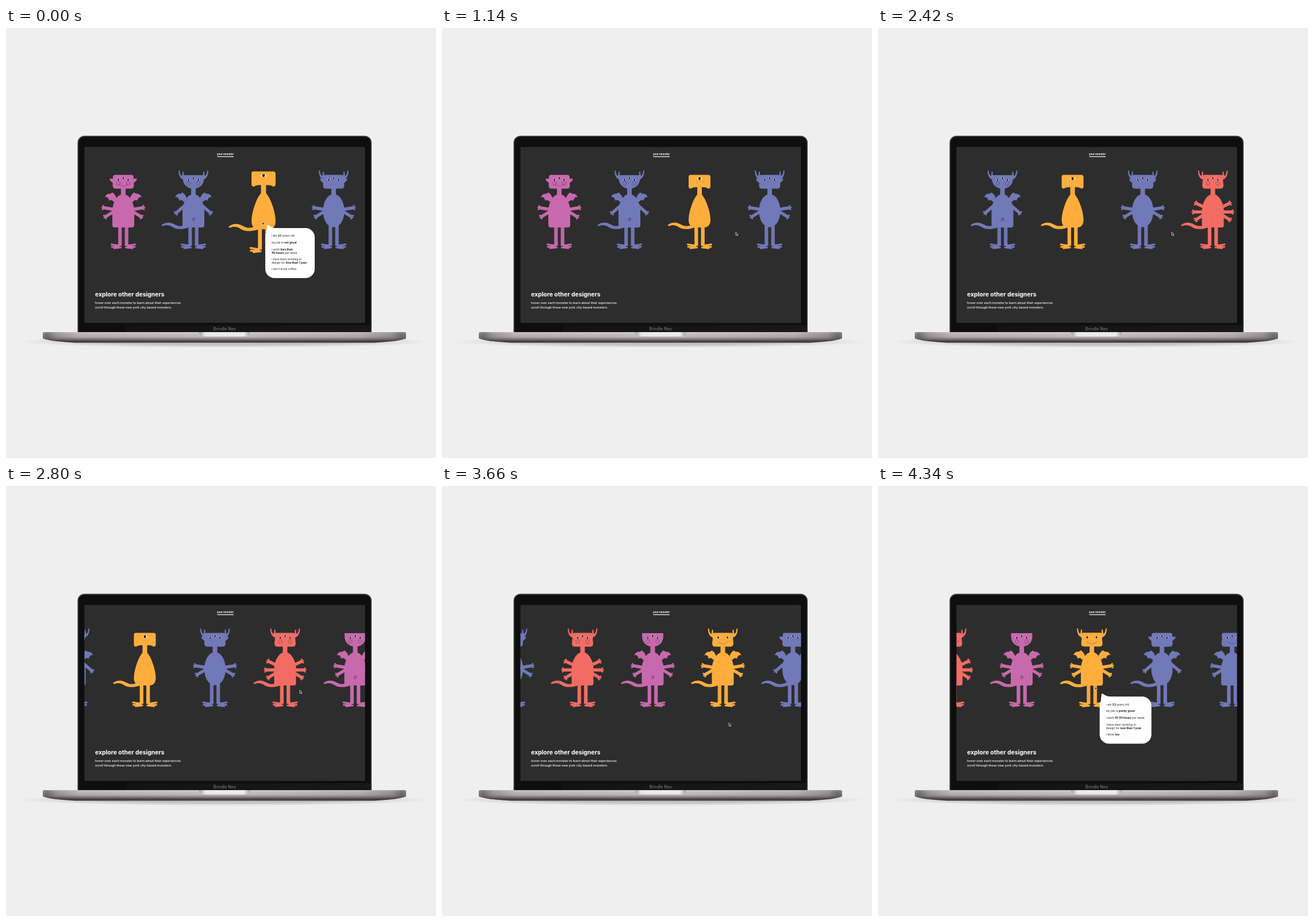
Write an HTML page with a canvas that moves like this. It is 748 by 748 pixels and loops after 4360 ms.

```html
<!DOCTYPE html>
<html lang="en">
<head>
<meta charset="utf-8">
<title>your monster</title>
<style>
html, body { margin: 0; width: 100%; height: 100%; overflow: hidden; background: #efefef; }
canvas { display: block; width: 748px; height: 748px; }
</style>
</head>
<body>
<canvas id="stage"></canvas>
<script>
const LOOP = 4360, STEP = 20, SIZE = 748, GAP = 122, MID_Y = 315;
const FONT = 'Inter, "Open Sans", sans-serif';
const PINK = '#c869ad', BLUE = '#7279b8', ORANGE = '#ffae3d', RED = '#f36c63';
const INK = 'rgba(35,25,50,.6)';

const canvas = document.getElementById('stage');
const ctx = canvas.getContext('2d');
const dpr = window.devicePixelRatio || 1;
canvas.width = canvas.height = SIZE * dpr;

const shapes = {
  rect: 'M-14 255.5H14Q18 255.5 18 259.5Q17 266 18.5 274Q18.5 279.5 13 279.5H-13Q-18.5 279.5 -18.5 274Q-17 266 -18 259.5Q-18 255.5 -14 255.5Z',
  bowl: 'M-18.5 256H18.5V261C18.5 273 10 279.5 0 279.5C-10 279.5 -18.5 273 -18.5 261Z',
  flare: 'M-16 255.5H16Q19 256 19 259.5V276Q18.5 279.5 15.5 279.5Q12 277 8 277H-8Q-12 277 -15.5 279.5Q-18.5 279.5 -19 276V259.5Q-19 255.5 -16 255.5Z',
  bell: 'M0 289C11.5 289 19 306 19 318V343Q19 347 15 347H-15Q-19 347 -19 343V318C-19 306 -11.5 289 0 289Z',
  oval: 'M0 289C11 289 18.5 303 18.5 318C18.5 334 11 346.5 0 346.5C-11 346.5 -18.5 334 -18.5 318C-18.5 303 -11 289 0 289Z',
  drop: 'M0 288C8 288 19 318 19 334C19 343 14 347 8 347H-8C-14 347 -19 343 -19 334C-19 318 -8 288 0 288Z',
  fin: 'M-23.5 261.5Q-19 263 -15 261V271Q-19 270 -20.5 267.5Q-23.5 266 -23.5 261.5Z',
  horn: 'M-16 264Q-25.5 262 -25.8 248.5Q-25 247 -23.8 248.5Q-23.5 255 -20.3 257.5Q-18.8 255 -19 250.5Q-17.8 249 -17 250.5Q-16.5 255 -17.5 259H-15Z',
  wing: 'M-9 305Q-12 290 -19 286Q-22 289 -26 288.5Q-30 289.5 -32 294.5Q-26.5 292 -24.5 300.5Q-20 297 -17 302.5Q-14 300 -9 305Z',
  tail: 'M-54.5 342C-46 336 -38 338.5 -32 342C-26 345.5 -18 346 -8 340V347C-22 351.5 -31 350 -36 346.5C-43 342 -48 342.5 -53 344.5Q-56 344.5 -54.5 342Z',
  spiral: 'M0 332Q1.5 331 1 333Q-1.5 334.5 -1.8 332Q-1.5 329.5 1 330Q3.4 331.5 2.4 334Q0 336.5 -2.8 334.5'
};
for (const k in shapes) shapes[k] = new Path2D(shapes[k]);

const monsters = [
  { color: PINK, head: 'rect', body: 'bell', fins: 1, wings: 1, arms: 2, eyes: 3, smile: 1, cheeks: 1, dots: 1 },
  { color: BLUE, head: 'bowl', body: 'bell', horns: 1, wings: 1, arms: 1, eyes: 3, cheeks: 1, navel: 1, tail: 1, dots: 1 },
  { color: ORANGE, head: 'flare', body: 'drop', arms: 0, eyes: 1, tail: 1 },
  { color: BLUE, head: 'rect', body: 'oval', fins: 1, horns: 1, arms: 2, eyes: 3, dots: 1 },
  { color: RED, head: 'rect', body: 'bell', horns: 1, arms: 3, eyes: 3, cheeks: 1, tail: 1 },
  { color: PINK, head: 'bowl', body: 'bell', wings: 1, arms: 2, eyes: 3, cheeks: 1, navel: 1, tail: 1 },
  { color: ORANGE, head: 'rect', body: 'bell', horns: 1, wings: 1, arms: 2, eyes: 2, smile: 1, tail: 1, dots: 1 },
  { color: BLUE, head: 'rect', body: 'oval', fins: 1, wings: 1, arms: 1, eyes: 3, tail: 1 },
  { color: BLUE, head: 'rect', body: 'bell', wings: 1, arms: 2, eyes: 3, smile: 1 }
];

// Arms as shoulder x, y and wrist x, y, by number of pairs
const armSets = [
  [],
  [[-13, 307, -28, 320]],
  [[-14, 316, -32, 313], [-14, 318, -29, 327]],
  [[-12, 313, -27, 306], [-14, 320, -31, 320], [-14, 324, -27, 332]]
];

// Speech bubbles; * toggles bold, each inner list is a paragraph
const hovers = [
  { who: 2, on: -300, off: 190, w: 86, h: 87, say: [['i am *23* years old'], ['my job is *not great*'],
    ['i work *less than', '*40 hours* per week'], ['i have been working in', 'design for *less than 1 year'], ['i don’t drink coffee']] },
  { who: 3, on: 210, off: 780, w: 91, h: 90, say: [['i am *57* years old'], ['my job is *pretty good'],
    ['i work *41-50 hours* per week'], ['i have been working in design', 'for *more than 20 years'], ['i drink *1-2 cups* of', 'coffee per day']] },
  { who: 5, on: 3010, off: 3205, w: 86, h: 85, say: [['i am *31* years old'], ['my job is *the best'],
    ['i work *41-50 hours* per week'], ['i have been working in', 'design for *5-8 years'], ['i drink *1-2 cups* of', 'coffee per day']] },
  { who: 6, on: 4312, off: 9999, w: 90, h: 82, say: [['i am *23* years old'], ['my job is *pretty good'],
    ['i work *41-50 hours* per week'], ['i have been working in', 'design for *less than 1 year'], ['i drink *tea']] }
];

// time, distance, speed
const scrollKeys = [[1640, 0, 0], [1800, 14, .14], [2420, 109.5, .22], [3160, 309, .28], [3660, 447.5, .27], [4260, 564, 0]];
// time, x, y
const pointerKeys = [[0, 446, 337], [180, 505, 344], [330, 528, 350], [520, 511, 355], [2960, 511, 355],
  [3160, 498, 386], [3205, 499, 389], [3260, 499, 412], [3900, 499, 412], [4200, 468, 404], [4320, 390, 374], [4340, 377.5, 349]];

const clamp = v => Math.max(0, Math.min(1, v));
const smooth = v => { v = clamp(v); return v * v * (3 - 2 * v); };

function segment(keys, t) {
  let i = 0;
  while (i < keys.length - 2 && t > keys[i + 1][0]) i++;
  const a = keys[i], b = keys[i + 1];
  return [a, b, clamp((t - a[0]) / (b[0] - a[0]))];
}
function scrollAt(t) {
  const [a, b, u] = segment(scrollKeys, t), d = b[0] - a[0], s = smooth(u);
  return a[1] + (b[1] - a[1]) * s + d * u * (1 - u) * (a[2] * (1 - u) - b[2] * u);
}
function pointerAt(t) {
  const [a, b, u] = segment(pointerKeys, t);
  return [a[1] + (b[1] - a[1]) * u, a[2] + (b[2] - a[2]) * u];
}

function fillRound(x, y, w, h, r, color) {
  ctx.fillStyle = color;
  ctx.beginPath();
  ctx.roundRect(x, y, w, h, r);
  ctx.fill();
}
function dot(x, y, rx, ry, color) {
  ctx.fillStyle = color;
  ctx.beginPath();
  ctx.ellipse(x, y, rx, ry, 0, 0, 7);
  ctx.fill();
}
function line(width, x, y, ...rest) {
  ctx.lineWidth = width;
  ctx.beginPath();
  ctx.moveTo(x, y);
  if (rest.length === 2) ctx.lineTo(...rest);
  else ctx.quadraticCurveTo(...rest);
  ctx.stroke();
}
function text(str, x, y, size, weight, color, align = 'left') {
  ctx.font = `${weight} ${size}px ${FONT}`;
  ctx.textAlign = align;
  ctx.fillStyle = color;
  ctx.fillText(str, x, y);
}
function gradient(x0, y0, x1, y1, ...stops) {
  const g = ctx.createLinearGradient(x0, y0, x1, y1);
  stops.forEach(([p, c]) => g.addColorStop(p, c));
  return g;
}

function drawArm(x1, y1, x2, y2) {
  line(5.5, x1, y1, x2, y2);
  const a = Math.atan2(y2 - y1, x2 - x1);
  for (const k of [-.7, 0, .7])
    line(2.6, x2, y2, x2 + Math.cos(a + k) * 5, y2 + Math.sin(a + k) * 5);
}

function drawHalf(m) {
  if (m.fins) ctx.fill(shapes.fin);
  if (m.wings) ctx.fill(shapes.wing);
  if (m.horns) ctx.fill(shapes.horn);
  armSets[m.arms].forEach(a => drawArm(...a));
  ctx.fillRect(-8.8, 344, 6.2, 35);
  line(4.5, -5, 374, -7, 380, -12, 380);
  line(3, -8, 378.5, -20.5, 376.5);
  line(3, -8, 380.5, -20, 380.8);
  line(3, -4.5, 381.8, -16, 383);
}

function drawFace(m) {
  if (m.eyes === 1) {
    dot(0, 262, 4, 2.1, '#fff');
    dot(0, 262, 2.2, 2.2, '#111');
  } else {
    const at = m.eyes === 2 ? [[-8, 263.5], [8, 263.5]] : [[-8.5, 264], [0, 261], [8.5, 264]];
    for (const [x, y] of at) {
      dot(x, y, 2.5, 1.4, '#e9e2ea');
      dot(x, y, 1.5, 1.6, '#111');
    }
  }
  ctx.strokeStyle = INK;
  if (m.smile) line(.55, -8, 271.5, 0, 278, 8, 271.5);
  if (m.cheeks) for (const x of [-8.5, 8.5]) {
    ctx.lineWidth = .55;
    ctx.beginPath();
    ctx.arc(x, 270.5, 3.2, 0, 7);
    ctx.stroke();
  }
  if (m.navel) {
    ctx.lineWidth = .7;
    ctx.stroke(shapes.spiral);
  }
  if (m.dots) for (let r = 0; r < 9; r++)
    for (const x of [-7.3, -4.3, 4.3, 7.3])
      dot(x + (r % 2 ? .5 : -.5), 348 + r * 3.1, .55, .55, 'rgba(30,20,50,.38)');
}

function drawMonster(m, x, scale) {
  ctx.save();
  ctx.translate(x, MID_Y);
  ctx.scale(scale, scale);
  ctx.translate(0, -MID_Y);
  ctx.fillStyle = ctx.strokeStyle = m.color;
  ctx.lineCap = 'round';
  ctx.fillRect(-4, 276, 8, 18);
  ctx.fill(shapes[m.head]);
  ctx.fill(shapes[m.body]);
  if (m.tail) ctx.fill(shapes.tail);
  drawHalf(m);
  ctx.scale(-1, 1);
  drawHalf(m);
  ctx.scale(-1, 1);
  drawFace(m);
  ctx.restore();
}

function drawBubble({ w, h, say }, [px, py]) {
  const x = px + 5, top = py + 11;
  fillRound(x, top, w, h, 16, '#fff');
  ctx.beginPath();
  ctx.moveTo(x + 1, top + 16);
  ctx.lineTo(x + 3.2, top - 4);
  ctx.quadraticCurveTo(x + 4, top - 6, x + 6, top - 4.5);
  ctx.quadraticCurveTo(x + 12, top, x + 20, top + .5);
  ctx.fill();
  let y = top + 15.3;
  for (const para of say) {
    para.forEach((row, i) => {
      let at = x + 11;
      row.split('*').forEach((part, j) => {
        text(part, at, y, 4.9, j % 2 ? 700 : 400, '#1c1c1c');
        at += ctx.measureText(part).width;
      });
      y += i < para.length - 1 ? 5.7 : 0;
    });
    y += para.length > 1 ? 11.3 : 11.9;
  }
}

function drawPointer([x, y]) {
  ctx.beginPath();
  [[0, 0], [0, 5.6], [1.3, 4.4], [2.2, 6.4], [3.2, 6], [2.3, 4], [4, 4]].forEach(([a, b]) => ctx.lineTo(x + a, y + b));
  ctx.closePath();
  ctx.fillStyle = '#111';
  ctx.fill();
  ctx.lineWidth = .7;
  ctx.strokeStyle = '#f2f2f2';
  ctx.stroke();
}

function drawLaptop() {
  ctx.fillStyle = '#efefef';
  ctx.fillRect(0, 0, SIZE, SIZE);

  // soft floor shadow
  ctx.save();
  ctx.translate(380, 546);
  ctx.scale(1, .028);
  const g = ctx.createRadialGradient(0, 0, 200, 0, 0, 360);
  g.addColorStop(0, 'rgba(90,100,100,.3)');
  g.addColorStop(1, 'rgba(90,100,100,0)');
  ctx.fillStyle = g;
  ctx.fillRect(-380, -400, 760, 800);
  ctx.restore();

  fillRound(124.5, 187.5, 511.5, 343, [12, 12, 0, 0], '#38383a');
  fillRound(126.3, 189.2, 507.9, 341, [10.5, 10.5, 0, 0], '#0e0e0e');
  ctx.fillStyle = gradient(209, 0, 634, 0, [0, '#131313'], [1, '#181818']);
  ctx.fillRect(209, 517, 425, 12);
  text('Brindle Neo', 380.3, 526.3, 7.1, 400, '#858585', 'center');

  const base = new Path2D('M66 529H694Q696 529 696 531V540Q684 545 640 547.5H120Q76 545 64 540V531Q64 529 66 529Z');
  ctx.fillStyle = gradient(64, 0, 696, 0, [0, '#7c797a'], [.012, '#6a6768'], [.04, '#989495'], [.1, '#b9b4b6'],
    [.5, '#c8c4c6'], [.87, '#b3aeb0'], [.96, '#928e90'], [.988, '#666364'], [1, '#777475']);
  ctx.fill(base);
  ctx.fillStyle = gradient(0, 529, 0, 547.5, [0, 'rgba(255,255,255,.2)'], [.4, 'rgba(120,115,117,.1)'],
    [.62, 'rgba(85,81,83,.5)'], [.85, 'rgba(55,52,53,.9)'], [1, 'rgba(60,57,58,.95)']);
  ctx.fill(base);
  fillRound(336, 529, 88.5, 7.5, [0, 0, 7, 7],
    gradient(336, 0, 424.5, 0, [0, '#a19d9f'], [.12, '#e9e9ea'], [.88, '#ececed'], [1, '#a19d9f']));
}

function draw(t) {
  ctx.setTransform(dpr, 0, 0, dpr, 0, 0);
  drawLaptop();

  ctx.save();
  ctx.beginPath();
  ctx.rect(136.5, 207, 488, 306);
  ctx.clip();
  ctx.fillStyle = '#2d2d2d';
  ctx.fillRect(136, 207, 489, 306);

  text('your monster', 381.6, 221.3, 4.5, 700, '#fff', 'center');
  ctx.fillRect(367.5, 223.2, 28.5, 1.2);
  text('explore other designers', 155, 467, 10.4, 700, '#fff');
  text('hover over each monster to learn about their experiences.', 155, 480, 5.45, 500, '#fff');
  text('scroll through these new york city-based monsters.', 155, 487.5, 5.45, 500, '#fff');

  const shift = scrollAt(t);
  monsters.forEach((m, i) => {
    const x = 204 + i * GAP - shift;
    if (x < 70 || x > 690) return;
    const h = hovers.find(h => h.who === i);
    const grow = h ? smooth((t - h.on) / 200) * (1 - smooth((t - h.off) / 200)) : 0;
    drawMonster(m, x, 1 + .1 * grow);
  });

  const open = hovers.find(h => t >= h.on && t < h.off);
  if (open) drawBubble(open, pointerAt(t - 5));
  drawPointer(pointerAt(t));
  ctx.restore();
}

const start = performance.now();
function tick() {
  const t = (performance.now() - start) % LOOP;
  draw(Math.floor(t / STEP) * STEP);
  requestAnimationFrame(tick);
}
tick();
</script>
</body>
</html>
```
